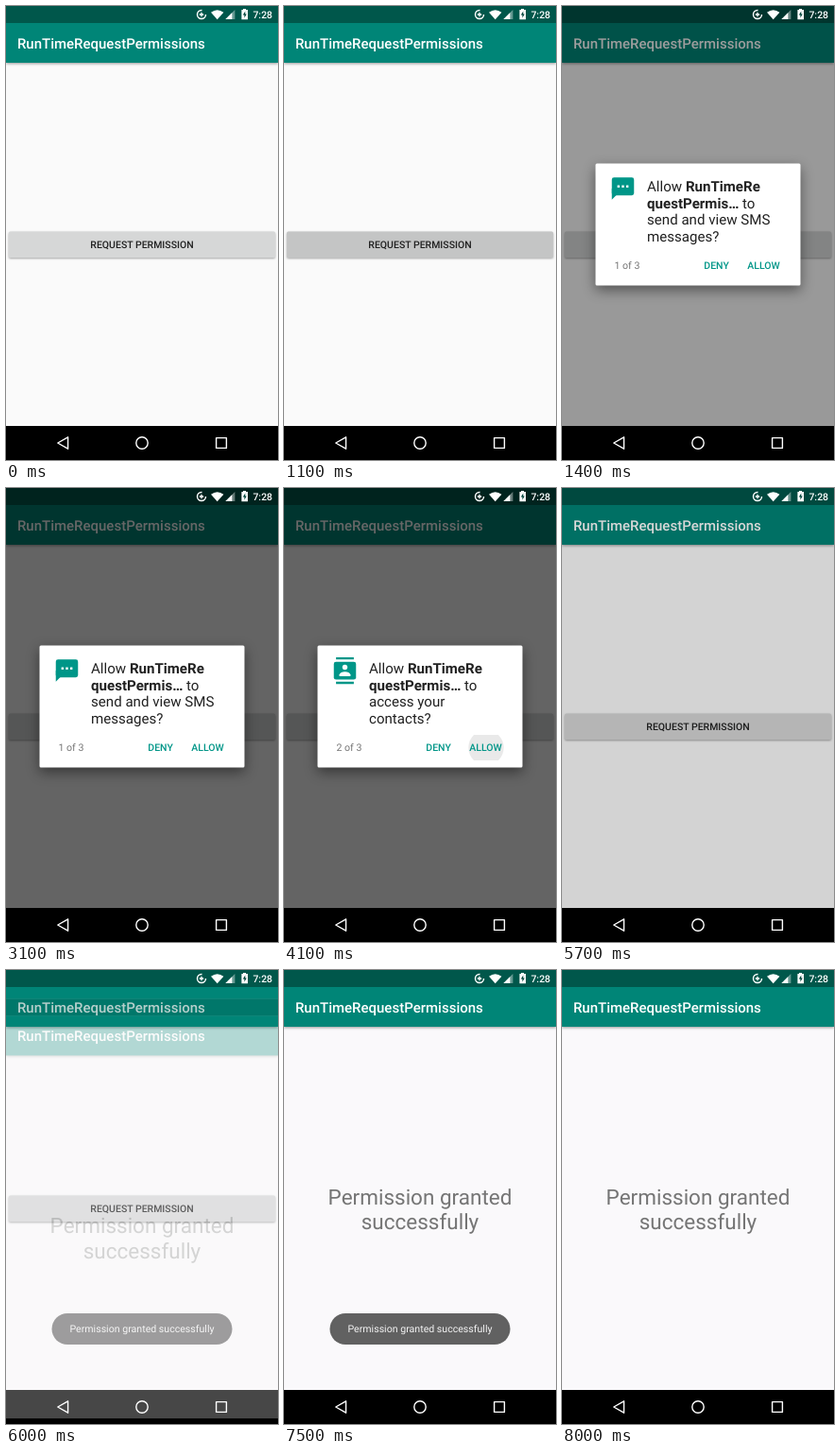
Write an HTML page that moves like this. It is 288x480 px and loops after 8300 ms.

```html
<!DOCTYPE html>
<html lang="en">
<head>
<meta charset="utf-8">
<title>Runtime permissions</title>
<style>
html, body { margin: 0; width: 100%; height: 100%; overflow: hidden; background: #000; }
svg { display: block; width: 288px; height: 480px; font-family: Roboto, "Noto Sans", sans-serif; text-rendering: geometricPrecision; }
.title { font-size: 15px; font-weight: 500; fill: #fff; }
.label { font-size: 10.5px; font-weight: 500; }
.small { font-size: 10.6px; }
.msg { font-size: 15.1px; fill: #212121; }
.msg .app { font-weight: 700; }
.big { font-size: 22.5px; fill: #757575; text-anchor: middle; }
.bar { fill: #008577; filter: drop-shadow(0 1px 1.5px rgba(0,0,0,.4)); }
.status { fill: #00574b; }
.btn { fill: #d6d7d7; filter: drop-shadow(0 1px 1px rgba(0,0,0,.35)); }
.card { fill: #fff; filter: drop-shadow(0 5px 7px rgba(0,0,0,.45)); }
.teal { fill: #009688; }
.line { fill: none; stroke: #fff; stroke-width: 1.4; stroke-linejoin: round; }
</style>
</head>
<body>
<svg viewBox="0 0 288 480">
  <defs>
    <clipPath id="btnClip"><rect x="3" y="238.5" width="282" height="27.5" rx="1.5"/></clipPath>
    <clipPath id="allowClip"><rect x="190" y="261" width="47" height="27" rx="1.5"/></clipPath>
    <clipPath id="cardClip"><rect x="35.5" y="166.5" width="217" height="129" rx="1.5"/></clipPath>
  </defs>

  <rect width="288" height="444" fill="#fafafa"/>
  <rect class="bar" y="18" width="288" height="42"/>
  <rect class="status" width="288" height="18"/>
  <text class="title" x="12" y="45">RunTimeRequestPermissions</text>
  <rect class="btn" x="3" y="238.5" width="282" height="27.5" rx="1.5"/>
  <g clip-path="url(#btnClip)"><circle id="btnRipple" cx="144" cy="252"/></g>
  <text class="label" x="144" y="256" text-anchor="middle" fill="#212121">REQUEST PERMISSION</text>
  <rect y="444" width="288" height="36"/>

  <g id="next">
    <rect width="288" height="444" fill="#faf9fb"/>
    <rect class="bar" y="18" width="288" height="42"/>
    <rect class="status" width="288" height="18"/>
    <text class="title" x="12" y="45">RunTimeRequestPermissions</text>
    <text class="big" x="144" y="247.7">Permission granted</text>
    <text class="big" x="144" y="274.2">successfully</text>
    <rect y="444" width="288" height="36"/>
  </g>

  <rect id="dim" width="288" height="444"/>

  <g id="dialog">
    <rect class="card" x="35.5" y="166.5" width="217" height="129" rx="1.5"/>
    <g id="steps" clip-path="url(#cardClip)"></g>
    <g clip-path="url(#allowClip)"><circle id="allowRipple" cx="214" cy="274.5"/></g>
    <text class="label teal" x="150.3" y="278">DENY</text>
    <text class="label teal" x="196.3" y="278">ALLOW</text>
  </g>

  <g id="toast">
    <rect x="48.5" y="363" width="191" height="33" rx="16.5" fill="#555"/>
    <text class="small" x="144" y="383.4" text-anchor="middle" fill="#f4f4f4">Permission granted successfully</text>
  </g>

  <g fill="#fff">
    <circle class="line" cx="207" cy="9" r="4.5" stroke-dasharray="21.2 7.1"/>
    <path d="M204.8 9H209.2M207 6.8V11.2" stroke="#fff" stroke-width="1.3"/>
    <path d="M217 6.8Q223.7 1.6 230.4 6.8L223.7 14.2Z"/>
    <path d="M242.4 4V14H232.4Z" opacity=".4"/>
    <path d="M239.4 7V14H232.4Z"/>
    <path d="M249.4 4H251V3H254V4H256V14.2H249.4Z"/>
    <path d="M253.3 5.6L250.8 9.6H252.4V12.6L254.8 8.5H253.3Z" fill="#00443a"/>
    <text class="label" x="261.4" y="12.8">7:28</text>
  </g>

  <path class="line" d="M54.8 462L65.6 455.8V468.2Z"/>
  <circle class="line" cx="144" cy="462" r="6.2"/>
  <rect class="line" x="222.6" y="456.6" width="10.8" height="10.8"/>
</svg>

<script>
const LOOP = 8300, STEP = 100;
const $ = id => document.getElementById(id);

const box = '<rect x="2" y="4" width="20" height="16" rx="2"/>';
const icons = {
  sms: `<rect x="2" y="2" width="20" height="16" rx="2"/><path d="M2 12V22L8 16Z"/>
    <path d="M7 10H17" stroke="#fff" stroke-width="2" stroke-dasharray="2"/>`,
  contact: `${box}<path d="M4 0H20V2H4ZM4 22H20V24H4Z"/>
    <g fill="#fff"><circle cx="12" cy="9" r="2.3"/><path d="M7 17V15.5Q8 13 12 13T17 15.5V17Z"/></g>`,
  camera: `${box}<path d="M7 4L9 2H15L17 4Z"/>
    <circle cx="12" cy="12" r="5" fill="#fff"/><circle cx="12" cy="12" r="3.2"/>`
};

// Parts between asterisks are bold.
const requests = [
  ['sms', 'Allow *RunTimeRe*', '*questPermis…* to', 'send and view SMS', 'messages?'],
  ['contact', 'Allow *RunTimeRe*', '*questPermis…* to', 'access your', 'contacts?'],
  ['camera', 'Allow *RunTimeRequ*', '*estPermis…* to take', 'pictures and record', 'video?']
];
const bold = s => s.replace(/\*(.+?)\*/g, '<tspan class="app">$1</tspan>');

$('steps').innerHTML = requests.map(([icon, ...lines], i) => `<g>
  <g class="teal" transform="translate(50.4 179) scale(1.175)">${icons[icon]}</g>
  ${lines.map((s, n) => `<text class="msg" x="90" y="${196.2 + n * 17.6}">${bold(s)}</text>`).join('')}
  <text class="small" x="55.5" y="278" fill="#757575">${i + 1} of 3</text></g>`).join('');
const panels = [...$('steps').children];

const linear = p => p;
const smooth = p => p * p * (3 - 2 * p);
const easeOut = power => p => 1 - (1 - p) ** power;

// Runs from 0 to 1 over the given span.
const ramp = (t, start, span, ease = smooth) => ease(Math.min(1, Math.max(0, (t - start) / span)));

function fade(id, value) {
  $(id).setAttribute('opacity', value);
}

function ripple(id, t, start, size) {
  const grow = ramp(t, start - 100, 300, linear);
  $(id).setAttribute('r', size * grow);
  fade(id, .13 * (grow - ramp(t, start + 200, 300, linear)));
}

function draw(t) {
  const shown = ramp(t, 1100, 300);
  fade('dim', .6 * (ramp(t, 1100, 500) - ramp(t, 5500, 300)));
  fade('dialog', shown - ramp(t, 5500, 200));
  $('dialog').setAttribute('transform', `translate(144 231) scale(${.9 + .1 * shown}) translate(-144 -231)`);

  const page = ramp(t, 3400, 500) + ramp(t, 4100, 500);
  panels.forEach((g, i) => g.setAttribute('transform', `translate(${(i - page) * 216} 0)`));

  // The new screen rises by 8% of the stage height.
  const open = 5984;
  fade('next', ramp(t, open, 200, easeOut(4)));
  $('next').setAttribute('transform', `translate(0 ${38.4 * (1 - ramp(t, open, 350, easeOut(5)))})`);
  fade('toast', ramp(t, 5860, 250, linear) - ramp(t, 7400, 600));

  ripple('btnRipple', t, 800, 150);
  const press = [5500, 4000, 3200].find(s => t >= s) || 3200;
  ripple('allowRipple', t, press, 28);
}

const begin = performance.now();
function tick() {
  const t = (performance.now() - begin) % LOOP;
  draw(Math.floor(t / STEP) * STEP);
  requestAnimationFrame(tick);
}
draw(0);
requestAnimationFrame(tick);
</script>
</body>
</html>
```
